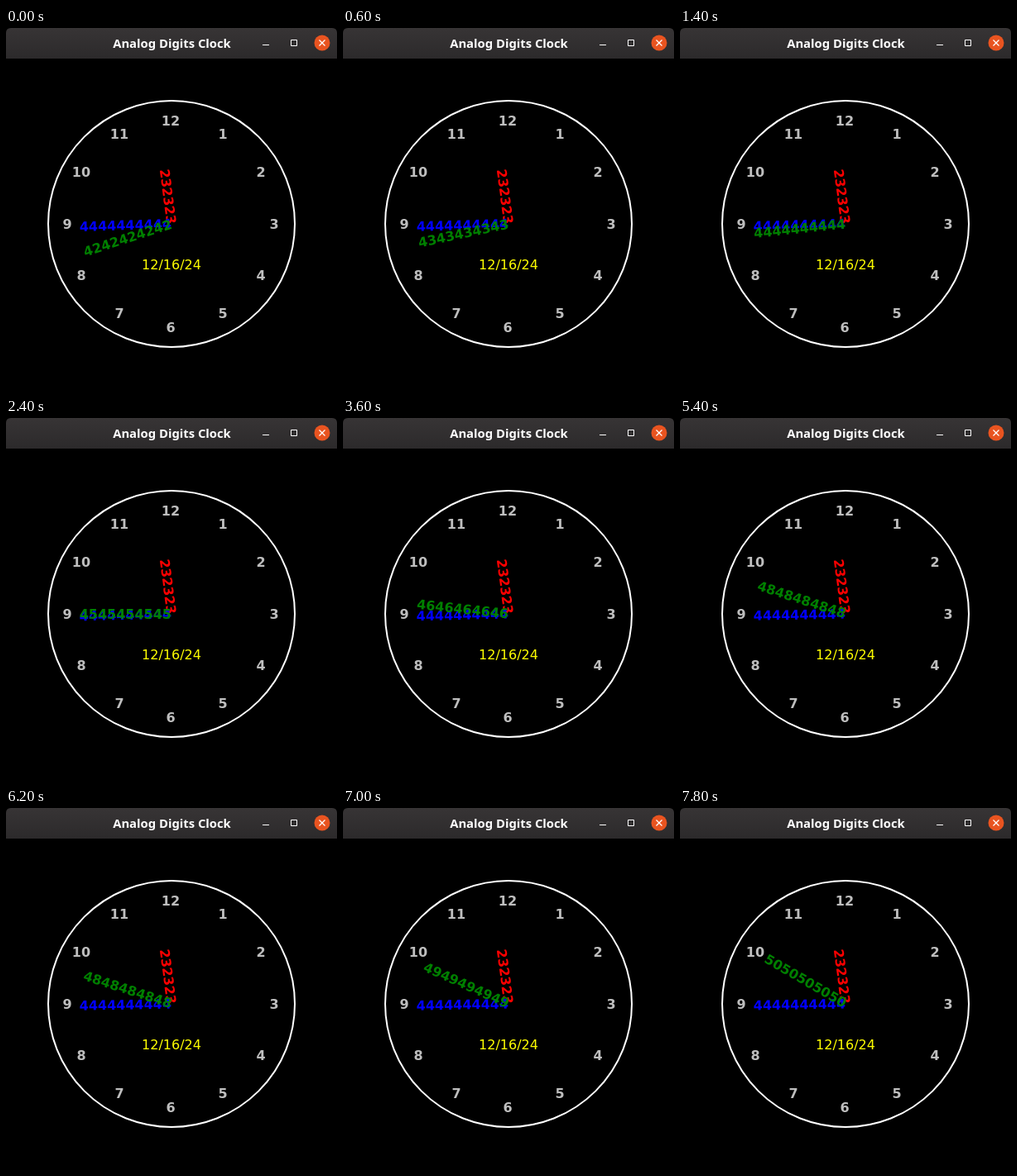
An HTML page that plays this animation: 400x438 px, repeating every 8000 ms.

```html
<!DOCTYPE html>
<html lang="en">
<head>
<meta charset="utf-8">
<title>Analog Digits Clock</title>
<style>
html, body { margin: 0; width: 100%; height: 100%; overflow: hidden; background: #000; }
svg { display: block; width: 400px; height: 438px; }
text { font: bold 16px "DejaVu Sans", sans-serif; text-anchor: middle; }
.title { font: bold 14.8px "Noto Sans", "Open Sans", sans-serif; fill: #fff; }
.date { font-weight: normal; fill: #ff0; }
.hand { text-anchor: end; }
#labels { fill: #bebebe; }
</style>
</head>
<body>
<svg viewBox="0 0 400 438">
  <defs>
    <linearGradient id="bar" x2="0" y2="1">
      <stop stop-color="#373435"/>
      <stop offset="1" stop-color="#2c2a2b"/>
    </linearGradient>
  </defs>
  <rect width="400" height="438"/>
  <path d="M0 37V6Q0 0 6 0H394Q400 0 400 6V37Z" fill="url(#bar)"/>
  <text class="title" x="200.5" y="24">Analog Digits Clock</text>
  <g fill="none" stroke="#fff">
    <path d="M310 20.5h8M344.5 14.5h7v7h-7z"/>
    <circle cx="382" cy="18" r="9.5" fill="#e95420" stroke="none"/>
    <path d="M378.5 14.5l7 7m0-7l-7 7" stroke-width="1.3"/>
    <circle cx="200" cy="237" r="149" stroke-width="2"/>
  </g>
  <g id="labels"></g>
  <text class="date" x="200" y="292">12/16/24</text>
  <g id="hands"></g>
</svg>
<script>
const CX = 200, CY = 237;

function addText(parent, attrs, content = "") {
  const el = document.createElementNS("http://www.w3.org/2000/svg", "text");
  for (const key in attrs) el.setAttribute(key, attrs[key]);
  el.textContent = content;
  return document.getElementById(parent).appendChild(el);
}

for (let h = 1; h <= 12; h++) {
  const a = h * Math.PI / 6;
  addText("labels", {
    x: Math.floor(CX + 125 * Math.sin(a) - 0.2),
    y: Math.floor(CY - 125 * Math.cos(a) + 0.01) + 6
  }, h);
}

const [hourHand, minuteHand, secondHand] = ["red", "blue", "green"].map(fill =>
  addText("hands", { class: "hand", x: CX, y: CY + 5.5, fill }));

// The text ends at the centre, so three quarters of a turn is level.
function setHand(hand, value, repeats, turn) {
  hand.textContent = String(value).repeat(repeats);
  hand.setAttribute("transform", `rotate(${turn * 360 - 270} ${CX} ${CY})`);
}

function draw(now) {
  const t = now % 8000;
  const sec = 42 + Math.floor((t + 600) / 1000);
  const min = 44 + sec / 60;
  const hour = 23 + min / 60;
  setHand(hourHand, 23, 3, hour / 12 - 1);
  setHand(minuteHand, 44, 5, min / 60);
  setHand(secondHand, sec, 5, sec / 60);
  requestAnimationFrame(draw);
}
draw(0);
</script>
</body>
</html>
```
